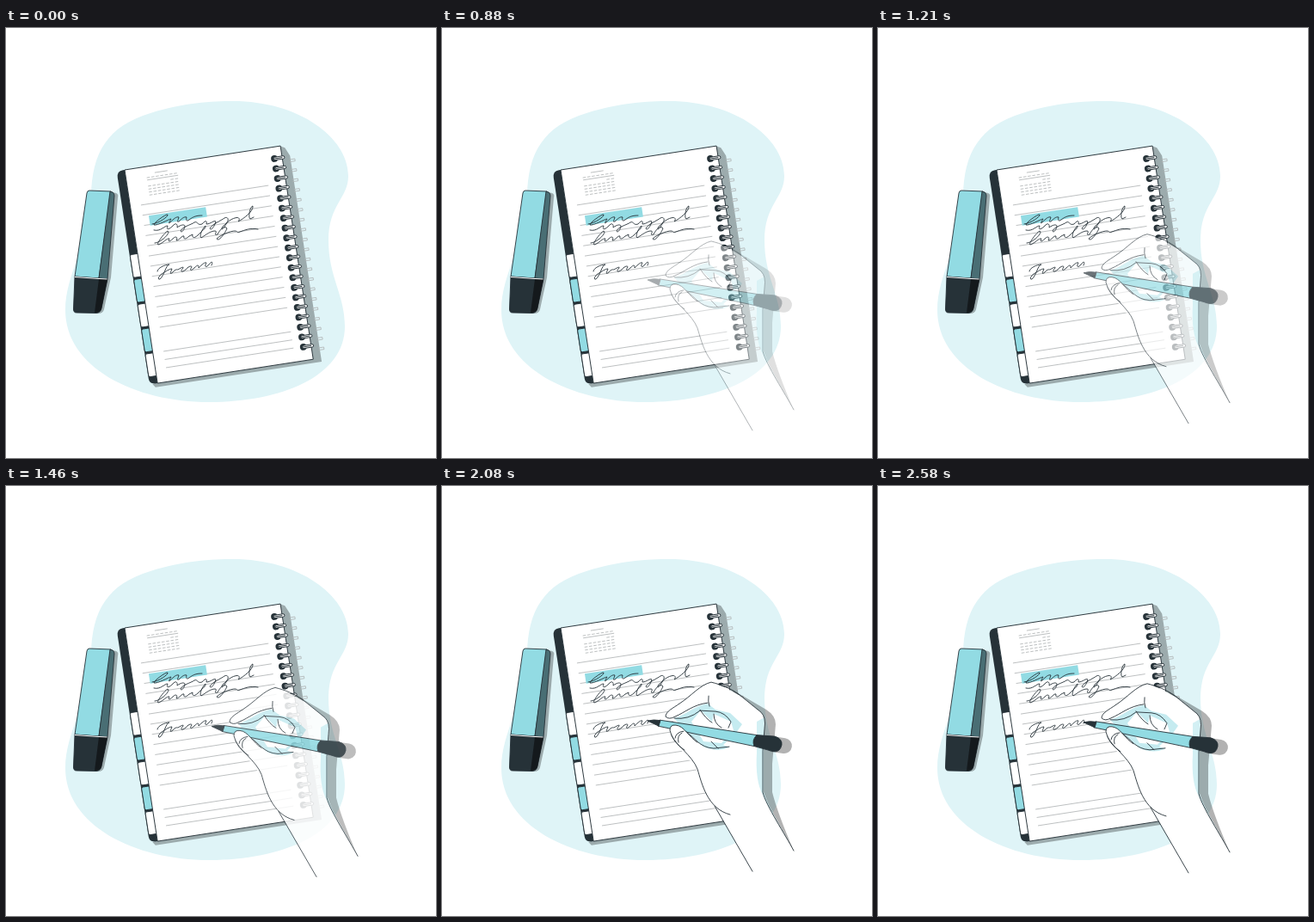
An HTML page for the animation above (2.62 s loop, 500 by 500 pixels).

```html
<!DOCTYPE html>
<html lang="en">
<head>
<meta charset="utf-8">
<title>Writing in a notebook</title>
<style>
  html, body { margin: 0; width: 100%; height: 100%; overflow: hidden; background: #fff; }
  svg { display: block; width: 100%; height: 100%; }
  .ink { fill: none; stroke: #263238; stroke-width: .9; stroke-linecap: round; stroke-linejoin: round; }
  .edge { stroke: #263238; stroke-width: .9; stroke-linejoin: round; }
  .dark { fill: #263238; }
  .cyan { fill: #92dbe3; }
  .pale { fill: #d3f0f4; }
  .white { fill: #fff; }
  .shadow { fill: #000; fill-opacity: .3; }
  .rule { fill: none; stroke: #b2b5b6; stroke-width: .8; }
</style>
</head>
<body>
<svg viewBox="0 0 500 500">
  <path fill="#dff4f7" d="M69 328C69 285 98 250 99 195C100 145 118 114 168 99C205 87 240 85 264 85C340 85 398 127 398 172C398 198 375 205 375 247C375 290 394 310 394 347C394 405 320 435 236 435C150 435 69 395 69 328Z"/>

  <g id="marker">
    <path class="shadow" d="M121 190L128 192Q131 193 130 197L122 290L114 327Q113 332 107 332L100 331Z"/>
    <path class="cyan edge" d="M97 189L122 190L108 291L80 289L94 192Q94.500 189 97 189Z"/>
    <path class="edge" fill="#496e74" d="M121 190L124 191Q126 192 126 195L118 292L108 291Z"/>
    <path class="dark edge" d="M80 289L118 292L111 326Q110 331 105 331.500L82 331Q78 331 78.500 326Z"/>
    <path fill="#14191c" d="M108 292L118 292L111 326Q110 331 103 331Z"/>
    <path fill="none" stroke="#fff" d="M80 289.500L108 291.500L117.500 292"/>
  </g>

  <g id="notebook" transform="translate(138 165) rotate(-8.75)">
    <path class="shadow" d="M183 0L188 3L192.500 13V255.200H-3L-6 251H183Z"/>
    <path class="dark" d="M0 0H-2Q-9.500 0 -9.500 8V244Q-9.500 251 -2 251H0Z"/>
    <g id="tabs"></g>
    <path class="white edge" d="M0 0H183.200V251H0Z"/>
    <g id="rules"></g>
    <g id="calendar" class="rule">
      <path d="M34 8.400H49M24 15.600H60.500"/>
      <path stroke-dasharray="3.600 1.700" d="M24 12.900H60.500M51 19.200H60.500M24 22.800H60.500M24 26.300H60.500M24 29.800H60.500M24 33.300H60.500"/>
    </g>
    <path class="cyan" d="M19.500 57H86.500V68.500H19.500Z"/>
    <g id="rings"></g>
  </g>

  <g id="writing" class="ink">
    <path d="M170 228C178 227 189 219 188 217C186 216 171 227 172 229C176 230 190 222 192 222C190 226 188 228 191 226C195 222 198 219 201 220C200 224 198 226 201 225C204 222 207 219 210 220C209 224 210 225 213 223C218 219 222 218 228 218"/>
    <path d="M172 235C180 237 184 230 188 230C186 235 189 235 194 230C197 226 200 228 199 232C203 229 207 228 208 230C208 234 204 239 203 236C205 231 215 229 219 226C223 224 222 230 228 228C232 223 234 224 233 228C238 228 242 223 244 225C242 232 238 236 237 233C240 228 250 224 254 221C257 219 260 222 257 226C252 236 249 235 252 231C258 225 262 222 266 221C272 219 272 223 270 225C276 222 288 213 287 207C284 207 281 220 284 222L288 220"/>
    <path d="M173 250C182 249 192 237 188 236C184 238 174 252 177 252C183 250 187 244 190 245C188 249 190 249 194 245C198 241 200 244 198 247C202 247 204 241 207 242C206 246 209 246 213 242L217 240C216 244 219 245 223 241C228 236 233 232 232 230C229 232 224 242 227 244C233 240 238 236 243 236C247 236 240 242 246 240C250 232 255 230 257 233C254 240 247 249 245 245C250 240 262 236 266 236C270 236 268 239 272 237C278 235 284 232 293 234"/>
    <path d="M176 283C176 279 185 275 190 275C186 275 184 288 179 292C176 293 177 289 181 286C186 283 190 280 193 280C191 285 190 287 194 284C197 280 199 281 200 281C203 279 207 277 206 279C202 283 204 285 209 281C212 277 216 276 216 278C213 282 215 283 219 279C223 275 224 275 224 279C228 275 231 272 233 273C230 278 233 279 236 275C239 271 241 271 239 276"/>
  </g>

  <g id="hand">
    <path class="shadow" d="M336 238L377 262Q388 269 388 279L384 325V358Q390 382 409 426L373 362V280Z"/>
    <rect class="shadow" x="376" y="294" width="31" height="18" rx="9" transform="rotate(8 391 303)"/>
    <path class="white" d="M313 230C326 234 340 242 350 248L371 265Q377 271 375 284L373 310V358C377 374 399 407 409 426L361 450L318 375C306 361 302 346 298 336C292 321 269 304 265 287L270 272L260 270C260 264 269 260 276 255C290 246 300 233 313 230Z"/>
    <path class="pale" d="M375 271L366 276L366 312Q364 345 373 361C378 375 400 407 409 426C398 403 381 380 374 358V310Z"/>
    <path fill="#c5ebf0" d="M270 272C284 268 294 257 309 255L318 262L335 266L349 279L342 289L327 303L334 306Q320 312 304 305L283 287Z"/>
    <path class="white" d="M290 276L301 263L314 276L316 267L336 276L339 286L325 301L304 299Z"/>
    <g class="ink">
      <path d="M345 244C335 237 325 233 313 230C300 233 290 246 276 255C269 260 260 264 260 270Q264 274 271 270C283 265 292 256 309 254M345 244L371 265Q377 271 375 284L373 310V358C377 374 399 407 409 426M310 246Q309 252 311 258M300 262Q307 273 314 277M270 272Q287 274 300 263L318 264Q329 265 336 276L333 283M316 267Q316 278 325 283M285 289C294 294 299 306 316 307L334 305M313 299L321 307"/>
      <path d="M267 291C271 303 291 315 297 331C302 347 308 377 335 384M317 374L361 450"/>
    </g>
    <g id="pen" class="edge">
      <path class="cyan" d="M253 274L366 291.500L363 304.500L251 281Z"/>
      <path class="dark" d="M239 275Q246 273 254 274.500L252 281Z"/>
      <path class="dark" d="M366 291.500L387 293Q396 296 395 303Q393 312 385 310.500L363 304.500Q360 297 366 291.500Z"/>
    </g>
    <path class="white" d="M267 291C262 283 267 279 273 280C283 283 286 294 300 303L291 315Q272 302 267 291Z"/>
    <path class="ink" d="M297 300C287 294 282 281 272 280Q265 279 265 286Q268 300 282 309M271 295Q272 288 281 287M275 300Q273 292 279 289"/>
  </g>
</svg>
<script>
const LOOP = 2620, RISE = 2600, FIRST_VISIBLE = 330, DROP = 30;
const byId = id => document.getElementById(id);
const repeat = (count, draw) => Array.from({ length: count }, (_, i) => draw(i)).join('');

byId('tabs').innerHTML = repeat(5, i =>
  `<rect class="${i % 2 ? 'cyan' : 'white'} edge" x="-9" y="${98.5 + i * 29.2}" width="12" height="27" rx="2"/>`);

const rule = y => `<path class="rule" d="M12.500 ${y}H162.500"/>`;
byId('rules').innerHTML = repeat(13, i => rule(43.3 + i * 11.98)) + repeat(3, i => rule(215.4 + i * 9.6));

byId('rings').innerHTML = repeat(20, i => `<g transform="translate(174 ${13.6 + i * 11.66})">
  <path class="rule" stroke="#9cabad" d="M17 3.700H23.500V6.300H17"/>
  <circle class="dark" r="3.900"/>
  <rect class="edge" x="-1" y="-1.700" width="13" height="3.400" rx="1.700" fill="#fff"/>
  <path class="ink" d="M0 0H9"/></g>`);

// Cubic Bezier (.36, -.01, .5, 1.38): rises past its rest, then settles.
const bezier = (a, b, s) => 3 * a * s * (1 - s) ** 2 + 3 * b * s * s * (1 - s) + s ** 3;
function ease(x) {
  let low = 0, high = 1;
  for (let i = 0; i < 24; i++) {
    const mid = (low + high) / 2;
    if (bezier(.36, .5, mid) < x) low = mid; else high = mid;
  }
  return bezier(-.01, 1.38, low);
}

const hand = byId('hand');
function frame() {
  const t = performance.now() % LOOP;
  const progress = ease(Math.min(1, t / RISE));
  hand.setAttribute('transform', `translate(0 ${DROP * (1 - progress)})`);
  hand.setAttribute('opacity', t < FIRST_VISIBLE ? 0 : Math.min(1, progress));
  requestAnimationFrame(frame);
}
frame();
</script>
</body>
</html>
```
